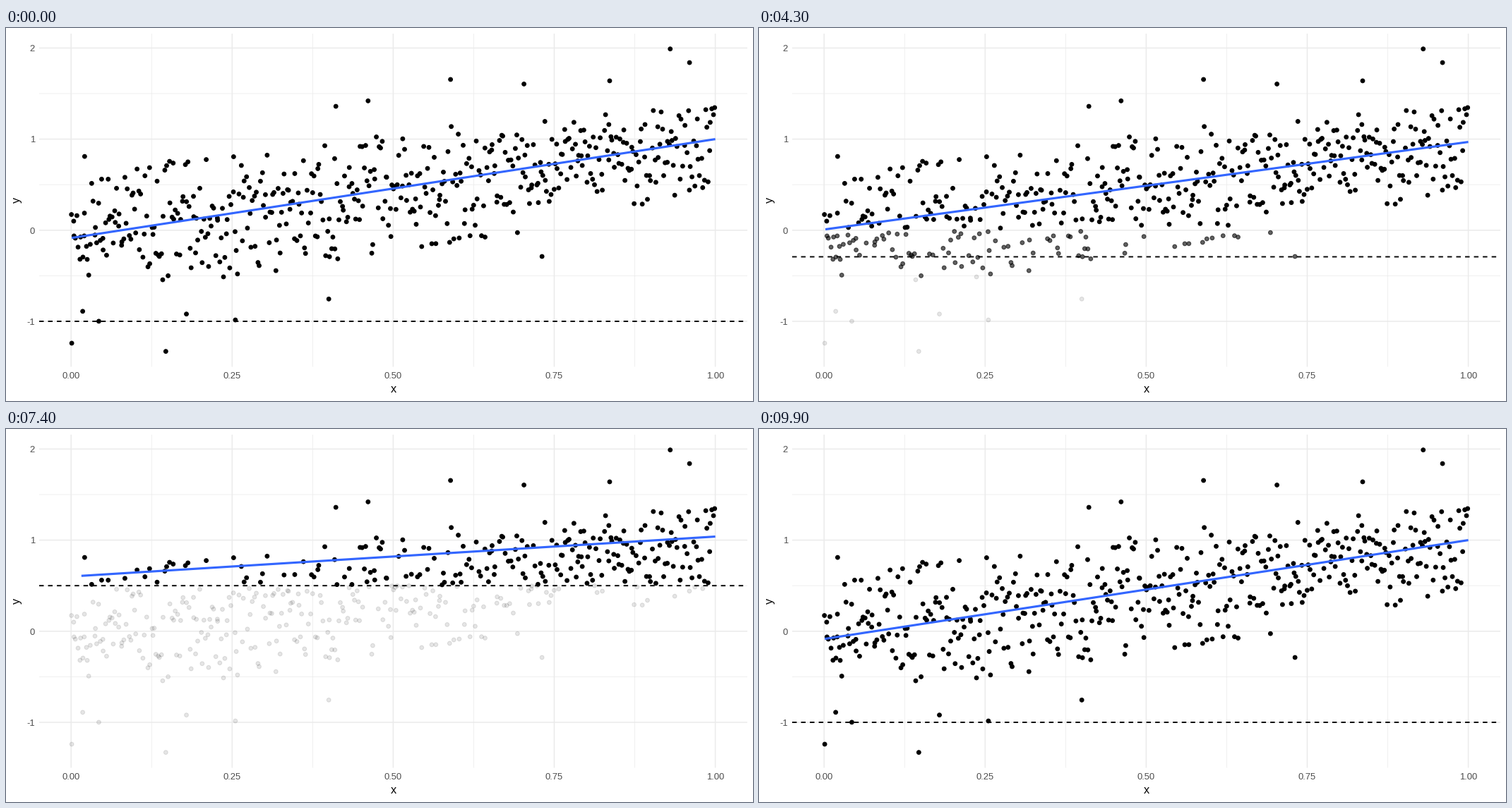
A matplotlib script for the animation above (10000 ms loop, 1058 by 529 pixels).

```python
import numpy as np
import matplotlib.pyplot as plt
from matplotlib.animation import FuncAnimation

W, H, DPI = 1058, 529, 64
FRAMES, INTERVAL = 100, 100
LEFT, RIGHT, TOP, BOTTOM = 47, 1050, 8, 480.5
GRID, TICK, BLUE = "#EBEBEB", "#4D4D4D", "#3366FF"
FAINT, TOTAL = 0.1, 500

# Cutoff per state, the frame at which each state is left, steps to the next one
CUTOFFS = [-1, -0.5, 0, 0.5]
LEAVE = [12, 38, 62, 87]
STEPS = [13, 12, 12, 12]

# Regression line per state: first x, height there, height at x = 1
FITS = [(0.001, -0.084, 1.0), (0.002, 0.01, 0.969),
        (0.002, 0.252, 0.952), (0.016, 0.608, 1.039)]

# The most extreme points; the rest of the cloud is random
EXTREMES = [(0.001, -1.24), (0.147, -1.33), (0.043, -0.999), (0.018, -0.89),
            (0.179, -0.92), (0.255, -0.985), (0.4, -0.755), (0.731, -0.288),
            (0.93, 1.99), (0.96, 1.84), (0.836, 1.64), (0.703, 1.605),
            (0.589, 1.655), (0.461, 1.42), (0.411, 1.36), (0.021, 0.81)]


def sx(x):
    return 92.2 + 912.4 * x


def sy(y):
    return 286.8 - 129.2 * y


def pt(px):
    return px * 72 / DPI


def make_points():
    """Noise around a rising trend, redrawn while it leaves the envelope."""
    rng = np.random.default_rng(12)
    n = TOTAL - len(EXTREMES)
    x = (np.arange(n) + rng.random(n)) / n
    low = -0.5 - 0.3 * np.sin(np.pi * x)
    high = 0.68 - 0.33 * x ** 3
    noise = rng.normal(0, 0.42, n)
    while (out := (noise < low) | (noise > high)).any():
        noise[out] = rng.normal(0, 0.42, out.sum())
    cloud = np.column_stack([x, -0.08 + 1.08 * x + noise])
    return np.vstack([cloud, EXTREMES])


def pose(i):
    """State being left and progress towards the next one."""
    state, t = 0, 0.0
    for k, start in enumerate(LEAVE):
        if i >= start:
            state, t = k, min(1, (i - start) / STEPS[k])
    return state, t


def opacity(state):
    if state == 0:
        return np.ones(TOTAL)
    return np.where(points[:, 1] < CUTOFFS[state], FAINT, 1.0)


points = make_points()
plt.rcParams["font.family"] = "Liberation Sans"
fig = plt.figure(figsize=(W / DPI, H / DPI), dpi=DPI, facecolor="white")
ax = fig.add_axes([0, 0, 1, 1])
ax.set_xlim(0, W)
ax.set_ylim(H, 0)
ax.axis("off")


def stroke(xs, ys, color, width, z, **kw):
    line, = ax.plot(xs, ys, color=color, lw=pt(width), zorder=z, snap=False,
                    solid_capstyle="butt", dash_capstyle="butt", **kw)
    return line


def label(x, y, text, size, color, ha="center", **kw):
    ax.text(x, y, text, fontsize=pt(size), color=color, ha=ha,
            va="baseline", **kw)


def draw_grid():
    for minor in (True, False):
        width = 0.79 if minor else 1.57
        for k in range(minor, 9, 2):
            x = sx(k / 8)
            stroke([x, x], [TOP, BOTTOM], GRID, width, 1)
            if not minor:
                label(x, 497, f"{k / 8:.2f}", 13, TICK)
        for k in range(-1 if minor else -2, 5, 2):
            y = sy(k / 2)
            stroke([LEFT, RIGHT], [y, y], GRID, width, 1)
            if not minor:
                label(41, y + 4.7, str(k // 2), 13, TICK, ha="right")
    label(548.4, 516.7, "x", 16.2, "black")
    label(20, 243.6, "y", 16.2, "black", rotation=90,
          rotation_mode="anchor")


draw_grid()
dots = ax.scatter(sx(points[:, 0]), sy(points[:, 1]), s=pt(5.74) ** 2,
                  linewidths=pt(1.04), color="black", zorder=3, snap=False)
fit = stroke([], [], BLUE, 3.14, 4)
cutoff = stroke([], [], "black", 1.9, 5, linestyle=(0, (3.4, 3.2)))


def update(i):
    state, t = pose(i)
    after = (state + 1) % len(CUTOFFS)

    rgba = np.zeros((TOTAL, 4))
    rgba[:, 3] = (1 - t) * opacity(state) + t * opacity(after)
    dots.set_facecolor(rgba)
    dots.set_edgecolor(rgba)

    y = sy((1 - t) * CUTOFFS[state] + t * CUTOFFS[after])
    cutoff.set_data([LEFT, RIGHT], [y, y])

    x0, y0, y1 = FITS[after if t == 1 else state]
    fit.set_data([sx(x0), sx(1)], [sy(y0), sy(y1)])
    return dots, fit, cutoff


anim = FuncAnimation(fig, update, frames=FRAMES, interval=INTERVAL,
                     init_func=lambda: update(0), repeat=True,
                     repeat_delay=0, blit=False)
plt.show()
```
